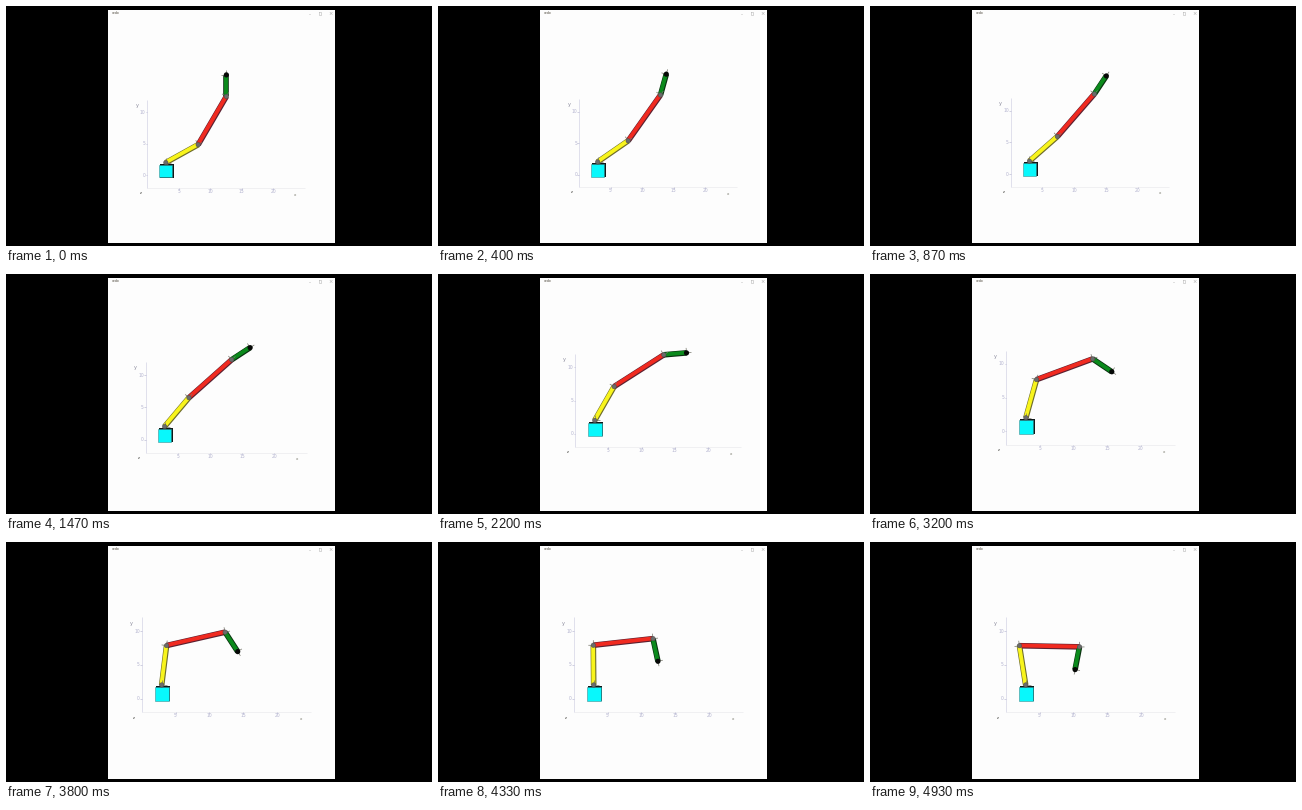
Animation, 426 px wide and 240 px high, one loop 4.99 s. Source, as a matplotlib script:

```python
import numpy as np
import matplotlib.pyplot as plt
from matplotlib.animation import FuncAnimation
from matplotlib.patches import Circle, Rectangle

W, H, DPI = 426, 240, 64
PX = 72 / DPI  # points per pixel
FRAMES, LOOP = 75, 4990

GREY, LABEL = "#6b6b6b", "#b4b4d0"
LINKS = [  # length, start angle, sweep, colour, outline
    (5.87, 29, 70, "#f8f41c", "#6e6c2a"),
    (8.87, 59.7, -60.8, "#f02a20", "#5c2030"),
    (3.42, 90, -191, "#0b8a1c", "#0a3010"),
]

fig = plt.figure(figsize=(W / DPI, H / DPI), dpi=DPI, facecolor="black")
ax = fig.add_axes([0, 0, 1, 1])
ax.set(xlim=(0, W), ylim=(H, 0))
ax.axis("off")


def line(color, width, z=2):
    return ax.plot([], [], color=color, lw=width * PX, zorder=z,
                   solid_capstyle="butt")[0]


def label(s, x=0, y=0, size=4.5, color=LABEL, ha="center"):
    return ax.text(x, y, s, fontsize=size * PX, color=color, ha=ha,
                   va="center", family="DejaVu Sans")


# Window with its title bar
ax.add_patch(Rectangle((102, 4), 227, 233, fc="#fdfdfd", lw=0))
label("vedo", 106, 7.5, 3.2, "#4c463a", "left")
for xs, ys in [([302.5, 304], [7.5, 7.5]),
               ([312.5, 315, 315, 312.5, 312.5], [6.2, 6.2, 8.7, 8.7, 6.2]),
               ([324, 326.3], [6.3, 8.6]), ([324, 326.3], [8.6, 6.3])]:
    ax.plot(xs, ys, color="#b0b0b0", lw=0.5 * PX)

# Axes
x_axis, y_axis = line("#ebebee", 0.7), line("#d4d4e6", 0.7)
x_ticks, y_ticks = line(LABEL, 0.6), line(LABEL, 0.6)
x_nums = [label(str(n)) for n in (5, 10, 15, 20)]
y_nums = [label(str(n), ha="right") for n in (0, 5, 10)]
names = [(label("x", size=4, color="#77776a"), 23.5, -1.05),
         (label("y", size=5, color="#8a8a9c"), -1.6, 13.15),
         (label("z", size=3.6, color="#2c2c26"), -1.1, -0.78)]

# Base
side = ax.add_patch(Rectangle((0, 0), 1, 1, fc="#101818", lw=0, zorder=3))
front = ax.add_patch(Rectangle((0, 0), 1, 1, fc="#08f8fc", ec="#3c8488",
                               lw=0.5 * PX, zorder=4))

# Arm
rods = [(line(edge, 5.6, 5), line(color, 3.9, 7))
        for *_, color, edge in LINKS]
marks = [line("#77776c", 0.7, 8) for _ in range(4)]
joints = [ax.add_patch(Circle((0, 0), 2.2, fc=GREY, ec="#4c4c4c",
                              lw=0.5 * PX, zorder=9)) for _ in LINKS]
tip = ax.add_patch(Circle((0, 0), 2.6, fc="#060806", lw=0, zorder=9))


def ticks(points, dx, dy):
    """Short strokes at the points, separated by gaps."""
    xs = [v for x, _ in points for v in (x, x + dx, np.nan)]
    ys = [v for _, y in points for v in (y, y + dy, np.nan)]
    return xs, ys


def cross(p, turn):
    """Local frame of a joint: one arm along the link, one across it."""
    c, n = 5 * np.cos(turn), 5 * np.sin(turn)
    return [p[0] + c, p[0], p[0] - n], [p[1] - n, p[1], p[1] - c]


def draw(i):
    # The camera closes in as the arm folds
    s = np.interp(i, [0, 13, 22, 33, 40, 57, 74],
                  [6.3, 6.35, 6.44, 6.65, 6.72, 6.77, 6.77])
    floor = 182 - 25 * (s - 6.3)

    def at(u, v):
        return np.array([215.6 + s * (u - 11.8), floor - s * v])

    x_axis.set_data(*zip(at(0, 0), at(25, 0)))
    y_axis.set_data(*zip(at(0, 0), at(0, 14)))
    xs = [at(u, 0) for u in (5, 10, 15, 20)]
    ys = [at(0, v) for v in (2, 7, 12)]
    x_ticks.set_data(*ticks(xs, 0, 1.5))
    y_ticks.set_data(*ticks(ys, -1.5, 0))
    for t, p in zip(x_nums, xs):
        t.set_position(p + (0, 3.5))
    for t, p in zip(y_nums, ys):
        t.set_position(p + (-1.8, 0))
    for t, u, v in names:
        t.set_position(at(u, v))

    a = 2.04 * s
    x, y = at(2.95, 2.7) - a / 2
    front.set_bounds(x, y, a, a)
    side.set_bounds(x + 1, y - 0.7, a + 0.9, a + 0.9)

    p = at(2.95, 4.03)
    turn = 0
    for k, (length, start, sweep, *_) in enumerate(LINKS):
        marks[k].set_data(*cross(p, turn))
        joints[k].center = p
        turn = np.radians(start + sweep * i / (FRAMES - 1))
        q = p + length * s * np.array([np.cos(turn), -np.sin(turn)])
        for rod, off in zip(rods[k], (0, -0.25)):
            rod.set_data(*zip(p + off, q + off))
        p = q
    marks[3].set_data(*cross(p, turn))
    tip.center = p
    return []


anim = FuncAnimation(fig, draw, frames=FRAMES, interval=LOOP / FRAMES,
                     init_func=lambda: draw(0), repeat=True, repeat_delay=0,
                     blit=False)
plt.show()
```
